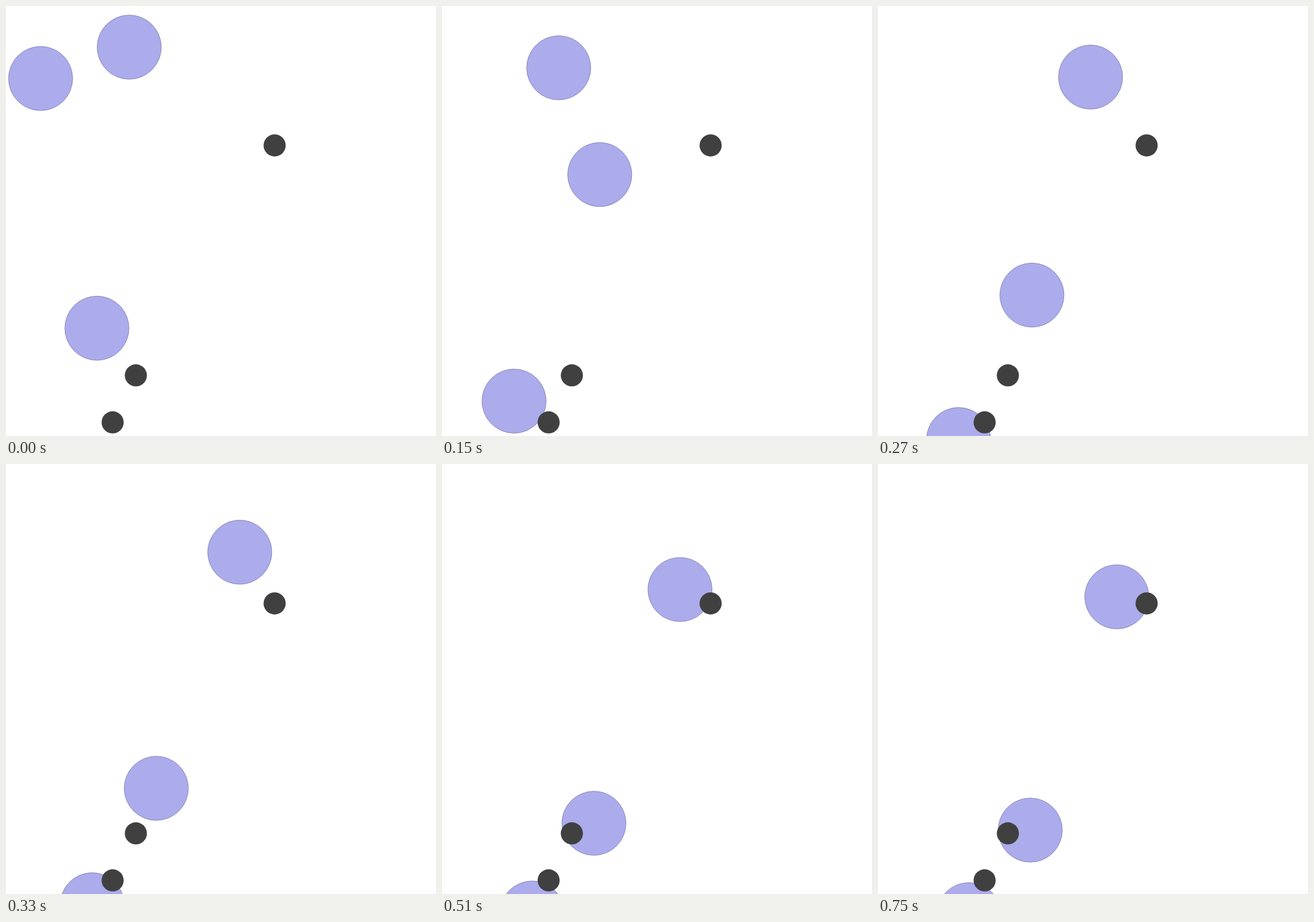
Animation of 700x700 px, one loop 0.78 s. Source, as an HTML page:

```html
<!DOCTYPE html>
<html lang="en">
<head>
<meta charset="utf-8">
<title>Drifting discs</title>
<style>
  html, body { margin: 0; width: 100%; height: 100%; overflow: hidden; background: #fff; }
  svg { display: block; width: 100%; height: 100%; }
  .disc { fill: #acabeb; stroke: #7272a6; stroke-width: .7; }
  .dot { fill: #404040; }
</style>
</head>
<body>
<svg viewBox="0 0 700 700">
  <g id="discs"></g>
  <g class="dot">
    <circle cx="437.3" cy="226.9" r="18"/>
    <circle cx="211.4" cy="601.3" r="18"/>
    <circle cx="173.6" cy="677.8" r="18"/>
  </g>
</svg>
<script>
const STEP = 30, STEPS = 26, FRICTION = 0.75;
const LEGS = [5, 4, 3]; // steps of steady push between key points

// Start, two points on the way, and where the disc finally rests.
const ROUTES = [
  [[56.3, 118], [190, 100.6], [346, 115.7], [388.9, 217.5]],
  [[200.6, 67], [256.8, 274.4], [250.6, 470.6], [247.9, 597.2]],
  [[148, 524.5], [117.3, 643.2], [131.2, 705.8], [148.1, 733.9]]
];

// Distance covered in n steps by coasting at unit speed.
const coast = n => FRICTION * (1 - FRICTION ** n) / (1 - FRICTION);

// One coordinate at every step: each leg's push is solved to reach its key point,
// the last one so that the disc comes to rest there after coasting.
function simulate(points) {
  let p = points[0], v = 0;
  const track = [p];
  const move = push => {
    v = v * FRICTION + push;
    p += v;
    track.push(p);
  };
  LEGS.forEach((n, i) => {
    const resting = i === LEGS.length - 1;
    const glide = coast(resting ? Infinity : n);
    const reach = (resting ? n : n - glide) / (1 - FRICTION);
    const push = (points[i + 1] - p - v * glide) / reach;
    for (let s = 0; s < n; s++) move(push);
  });
  while (track.length < STEPS) move(0);
  return track;
}

const discs = ROUTES.map(route => {
  const el = document.createElementNS("http://www.w3.org/2000/svg", "circle");
  el.setAttribute("class", "disc");
  el.setAttribute("r", 52.2);
  document.getElementById("discs").append(el);
  return { el, x: simulate(route.map(p => p[0])), y: simulate(route.map(p => p[1])) };
});

function draw() {
  const k = Math.floor(performance.now() / STEP) % STEPS;
  for (const { el, x, y } of discs) {
    el.setAttribute("cx", x[k].toFixed(2));
    el.setAttribute("cy", y[k].toFixed(2));
  }
  requestAnimationFrame(draw);
}
draw();
</script>
</body>
</html>
```
